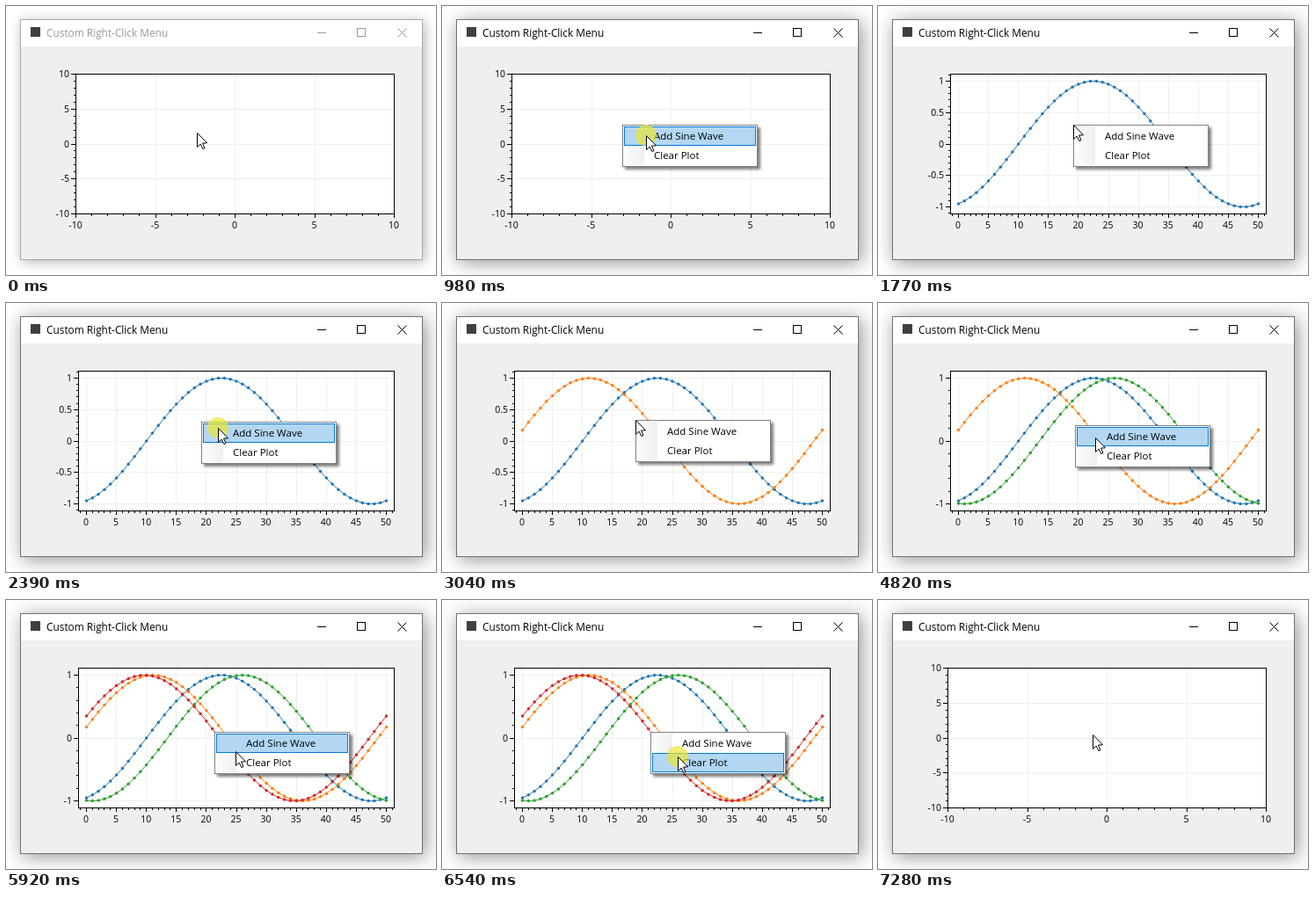
An HTML page with a canvas that plays this animation: 489x306 px, repeating every 7.33 s.

```html
<!DOCTYPE html>
<html lang="en">
<head>
<meta charset="utf-8">
<title>Custom Right-Click Menu</title>
<style>
html, body { margin: 0; width: 100%; height: 100%; overflow: hidden; background: #fff; }
canvas { display: block; }
</style>
</head>
<body>
<canvas id="stage" width="489" height="306"></canvas>
<script>
const ctx = document.getElementById('stage').getContext('2d');
const LOOP = 7330;
const FONT = '"Open Sans", "Noto Sans", sans-serif';
const GRID = '#efefef';

// Each round: right-click at spot, menu opens, pick an item, then act.
// A round with a color adds a wave; the one without clears the plot.
const ROUNDS = [
  { open: 380, act: 1080, spot: [205, 135], pick: [232, 147], color: '#1f77b4', shift: -10 },
  { open: 1770, act: 2470, spot: [222, 135], pick: [241, 142], color: '#ff7f0e', shift: 1.4 },
  { open: 3040, act: 3610, spot: [220, 133], pick: [235, 142], color: '#2ca02c', shift: -13.5 },
  { open: 4250, act: 5130, spot: [224, 139], pick: [247, 153], color: '#d62728', shift: 2.84 },
  { open: 5510, act: 6640, spot: [237, 150], pick: [268, 178] }
];
const FIRST = ROUNDS[0], LAST = ROUNDS[ROUNDS.length - 1];
const HOME = [217, 144], REST = [244, 153];
const PRESS = 100;

function pointerAt(t) {
  let at = HOME;
  const move = (start, length, to) => {
    const p = Math.max(0, Math.min(1, (t - start) / length));
    at = at.map((v, i) => v + (to[i] - v) * p);
  };
  for (const { open, spot, pick } of ROUNDS) {
    move(open - 360, 240, spot);
    move(open + 180, 300, pick);
  }
  move(LAST.act + 480, 150, REST);
  return at.map(Math.round);
}

const pressedFor = (t, end) => t >= end - PRESS && t < end;

function rect(x, y, w, h, color) {
  ctx.fillStyle = color;
  ctx.fillRect(x, y, w, h);
}

function frame(x, y, w, h, color) {
  ctx.strokeStyle = color;
  ctx.lineWidth = 1;
  ctx.strokeRect(x + 0.5, y + 0.5, w - 1, h - 1);
}

function text(str, x, y, size, color = '#000', align = 'left') {
  ctx.font = `${size}px ${FONT}`;
  ctx.textAlign = align;
  ctx.fillStyle = color;
  ctx.fillText(str, x, y);
}

function shadowed(x, y, w, h, offset, blur, alpha) {
  ctx.save();
  ctx.shadowColor = `rgba(0,0,0,${alpha})`;
  ctx.shadowBlur = blur;
  ctx.shadowOffsetX = ctx.shadowOffsetY = offset;
  rect(x, y, w, h, '#fff');
  ctx.restore();
}

function drawWindow(active) {
  const ink = active ? '#000' : '#999';
  rect(0, 0, 489, 306, '#fff');
  shadowed(16, 15, 458, 274, active ? 3 : 2, active ? 20 : 13, active ? 0.42 : 0.3);
  rect(16, 46, 458, 243, GRID);
  frame(16, 15, 458, 274, active ? '#707070' : '#aaa');

  rect(28, 24, 11, 11, '#404040');
  text('Custom Right-Click Menu', 46, 35, 11.85, ink);

  rect(354, 30, 10, 1, ink);
  frame(399, 25, 10, 10, ink);
  ctx.beginPath();
  for (const s of [-5, 5]) {
    ctx.moveTo(450.5 - s, 25.5);
    ctx.lineTo(450.5 + s, 35.5);
  }
  ctx.stroke();
}

// Ticks between lo and hi, five minor steps to each major one
function ticks(lo, hi, major) {
  const minor = major / 5, list = [];
  for (let i = Math.ceil(lo / minor - 1e-6); i <= hi / minor + 1e-6; i++) {
    list.push({ v: +(i * minor).toFixed(3), major: i % 5 === 0 });
  }
  return list;
}

function drawPlot(waves) {
  const empty = waves.length === 0;
  const left = empty ? 79 : 82, right = 441, top = 77, bottom = 236;
  const w = right - left, h = bottom - top;
  const midX = left + w / 2, midY = top + h / 2;
  const x0 = empty ? 0 : 25;
  const spanX = empty ? 10 : 25 / 0.95;
  const spanY = empty ? 10 : 1 / 0.9;
  const px = v => midX + (v - x0) / spanX * w / 2;
  const py = v => midY - v / spanY * h / 2;
  const ticksX = ticks(x0 - spanX, x0 + spanX, 5);
  const ticksY = ticks(-spanY, spanY, empty ? 5 : waves.length > 2 ? 1 : 0.5);

  rect(left, top, w, h, '#fff');
  for (const { v, major } of ticksX) if (major) rect(Math.round(px(v)), top, 1, h, GRID);
  for (const { v, major } of ticksY) if (major) rect(left, Math.round(py(v)), w, 1, GRID);

  for (const wave of waves) drawWave(wave, px, py);

  frame(left, top, w + 1, h + 1, '#000');
  for (const { v, major } of ticksX) {
    rect(Math.round(px(v)), bottom + 1, 1, major ? 4 : 2, '#000');
    if (major) text(v, px(v), 253, 10.5, '#000', 'center');
  }
  for (const { v, major } of ticksY) {
    const len = major ? 5 : 2, y = Math.round(py(v));
    rect(left - len, y, len, 1, '#000');
    if (major) text(v, left - 7, y + 4, 10.5, '#000', 'right');
  }
}

function drawWave({ color, shift }, px, py) {
  const at = i => [px(i) + 0.5, py(Math.sin(2 * Math.PI * (i + shift) / 50)) + 0.5];
  ctx.strokeStyle = ctx.fillStyle = color;
  ctx.lineWidth = 1;
  ctx.beginPath();
  for (let i = 0; i <= 50; i++) ctx.lineTo(...at(i));
  ctx.stroke();
  for (let i = 0; i <= 50; i++) {
    ctx.beginPath();
    ctx.arc(...at(i), 1.75, 0, 2 * Math.PI);
    ctx.fill();
  }
}

function drawMenu([x, y], [mx, my]) {
  shadowed(x, y, 154, 48, 3, 3, 0.5);
  const gutter = ctx.createLinearGradient(x + 2, 0, x + 25, 0);
  gutter.addColorStop(0, '#fcfcfc');
  gutter.addColorStop(1, '#f0f0f0');
  rect(x + 2, y + 2, 23, 44, gutter);
  frame(x, y, 154, 48, '#808080');
  ['Add Sine Wave', 'Clear Plot'].forEach((label, i) => {
    const iy = y + 2 + i * 22;
    if (mx >= x + 2 && my >= iy && my < iy + 22) {
      rect(x + 2, iy, 150, 22, '#b3d7f3');
      frame(x + 2, iy, 150, 22, '#0078d7');
    }
    text(label, x + 36, iy + 15, 11.5);
  });
}

function drawPointer([x, y], pressed) {
  if (pressed) {
    ctx.fillStyle = 'rgba(234,230,50,0.7)';
    ctx.beginPath();
    ctx.arc(x, y, 12, 0, 2 * Math.PI);
    ctx.fill();
  }
  ctx.save();
  ctx.translate(x + 0.5, y + 0.5);
  const arrow = new Path2D('M0 0V16L3.7 12.6 6.3 18 8.5 17.2 6 11.6 11 11.3Z');
  ctx.fillStyle = '#fff';
  ctx.fill(arrow);
  ctx.strokeStyle = '#000';
  ctx.lineWidth = 1;
  ctx.stroke(arrow);
  ctx.restore();
}

function draw(t) {
  const pointer = pointerAt(t);
  const round = ROUNDS.find(r => t >= r.open && t < r.act);
  drawWindow(t >= FIRST.open - PRESS);
  drawPlot(t < LAST.act ? ROUNDS.filter(r => r.color && t >= r.act) : []);
  if (round) drawMenu(round.spot, pointer);
  drawPointer(pointer, ROUNDS.some(r => pressedFor(t, r.open) || pressedFor(t, r.act)));
}

const began = performance.now();
function tick() {
  draw((performance.now() - began) % LOOP);
  requestAnimationFrame(tick);
}
tick();
</script>
</body>
</html>
```
